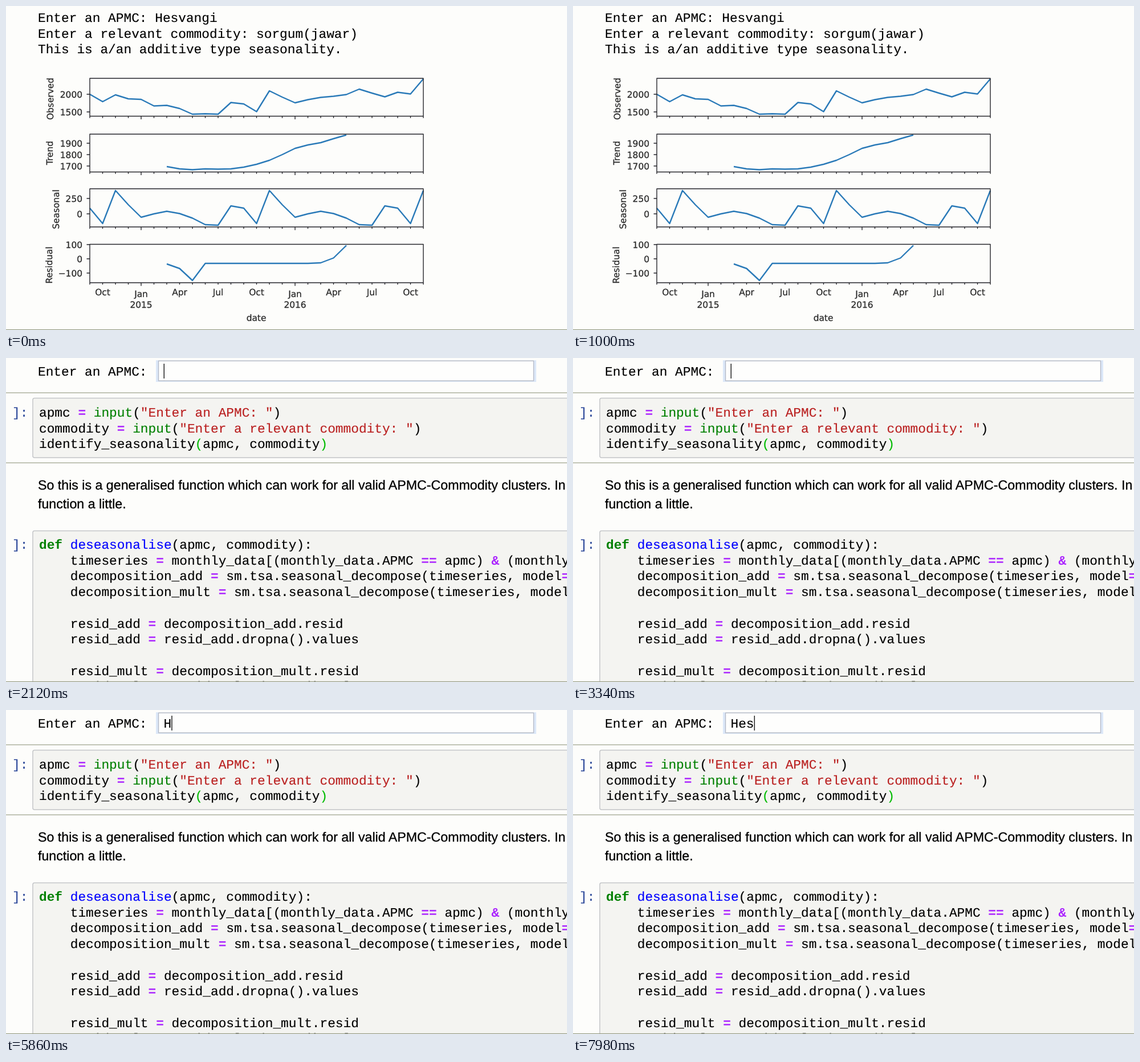
An HTML page with a canvas for the animation above (8000 ms loop, 984 by 569 pixels).

```html
<!DOCTYPE html>
<html lang="en">
<head>
<meta charset="utf-8">
<title>Seasonality notebook</title>
<style>
  html, body { margin: 0; width: 100%; height: 100%; overflow: hidden; background: #fdfdfb; }
  canvas { display: block; width: 984px; height: 569px; }
</style>
</head>
<body>
<canvas id="stage" width="984" height="569"></canvas>
<script>
const ctx = document.getElementById('stage').getContext('2d');
const W = 984, H = 569, LOOP = 8000;
const MONO = '22.8px "Liberation Mono", monospace';
const SANS = '23.19px "Liberation Sans", sans-serif';
const LABEL = '15.4px "DejaVu Sans", sans-serif';
const LABEL_COLOR = '#2b2b2b';
const MARKET = 'Hesvangi';
const LINE_H = 27.7;

// Times at which the input view opens and each letter appears
const OPEN_AT = 2110;
const KEY_TIMES = [5400, 6900, 7200];

const COLORS = {
  plain: '#000', op: '#aa22ff', key: '#008000', builtin: '#008000',
  name: '#0000ff', string: '#ba2121', match: '#00bb00'
};

// A thin outline gives the text its slightly heavy weight
function text(str, x, y, font, color, align = 'left', outline = 0.3) {
  ctx.font = font;
  ctx.fillStyle = ctx.strokeStyle = color;
  ctx.textAlign = align;
  ctx.lineWidth = outline;
  ctx.fillText(str, x, y);
  if (outline) ctx.strokeText(str, x, y);
}

const label = (str, x, y, align = 'center') => text(str, x, y, LABEL, LABEL_COLOR, align);

function mono(str, x, y, color = '#000', bold = false) {
  text(str, x, y, (bold ? 'bold ' : '') + MONO, color, 'left', bold ? 0 : 0.15);
  return x + ctx.measureText(str).width;
}

function kindOf(token, matchParens) {
  if (token[0] === '"' || token[0] === "'") return 'string';
  if (/^(==?|&)$/.test(token)) return 'op';
  if (token === 'def') return 'key';
  if (token === 'input') return 'builtin';
  if (token === 'deseasonalise') return 'name';
  if (matchParens && /^[()]$/.test(token)) return 'match';
  return 'plain';
}

function codeLine(line, x, y, matchParens = false) {
  const tokens = line.match(/"[^"]*"|'[^']*'|==|\w+|\s+|./g) || [];
  for (const token of tokens) {
    const kind = kindOf(token, matchParens);
    x = mono(token, x, y, COLORS[kind], kind === 'op' || kind === 'key');
  }
}

function rule(y) {
  ctx.fillStyle = '#9a9f88';
  ctx.fillRect(0, y, W, 1.2);
}

function codeBox(top, bottom) {
  ctx.beginPath();
  ctx.roundRect(47, top, 1000, bottom - top, 3);
  ctx.fillStyle = '#f4f4f1';
  ctx.fill();
  ctx.strokeStyle = '#c3c5c8';
  ctx.lineWidth = 1.5;
  ctx.stroke();
}

const LEFT = 147, RIGHT = 732, MONTHS = 26;
const STEP = (RIGHT - LEFT) / MONTHS;
const monthX = i => LEFT + i * STEP;

const YEAR = [355, 382, 324, 349, 371, 365, 360.5, 364.5, 372.5, 384, 385, 351];
const PANELS = [
  { title: 'Observed', tx: 83, ty: 163, top: 127, bottom: 193.5, start: 0,
    ticks: [['2000', 155], ['1500', 186]],
    ys: [155, 168, 156, 163, 164, 175.5, 174.5, 180, 190, 189.3, 190, 169.5, 172, 185.5,
         149, 160, 170, 164.5, 160.5, 158.5, 155.5, 146, 153, 159.5, 151.5, 154.5, 128] },
  { title: 'Trend', tx: 82, ty: 258, top: 225, bottom: 291.5, start: 6,
    ticks: [['1900', 241], ['1800', 261], ['1700', 281]],
    ys: [282, 286, 287.5, 286, 286.5, 286, 283, 278, 271, 261, 250, 244, 240, 233, 226.5] },
  { title: 'Seasonal', tx: 93, ty: 357, top: 321, bottom: 388, start: 0,
    ticks: [['250', 338], ['0', 365]],
    ys: Array.from({ length: MONTHS + 1 }, (_, i) => YEAR[i % 12]) },
  { title: 'Residual', tx: 81, ty: 455, top: 418.5, bottom: 486, start: 6,
    ticks: [['100', 419], ['0', 444], ['\u2212100', 469]],
    ys: [453, 461, 482, ...Array(9).fill(452), 451, 442.5, 420.5] }
];

function segment(x1, y1, x2, y2) {
  ctx.moveTo(x1, y1);
  ctx.lineTo(x2, y2);
}

function drawPanel(p) {
  ctx.beginPath();
  p.ys.forEach((y, i) => ctx.lineTo(monthX(p.start + i), y));
  ctx.strokeStyle = '#2a7ab8';
  ctx.lineWidth = 2.4;
  ctx.lineJoin = 'round';
  ctx.stroke();

  ctx.beginPath();
  ctx.rect(LEFT, p.top, RIGHT - LEFT, p.bottom - p.top);
  for (let i = 0; i <= MONTHS; i++) {
    segment(monthX(i), p.bottom, monthX(i), p.bottom + (i % 12 === 4 ? 5.5 : 3.2));
  }
  for (const [, y] of p.ticks) segment(LEFT - 5.5, y, LEFT, y);
  ctx.strokeStyle = '#25252b';
  ctx.lineWidth = 1.4;
  ctx.stroke();

  for (const [value, y] of p.ticks) label(value, 134, y + 5.7, 'right');
  ctx.save();
  ctx.translate(p.tx, p.ty);
  ctx.rotate(-Math.PI / 2);
  label(p.title, 0, 0);
  ctx.restore();
}

function drawResult() {
  ['Enter an APMC: ' + MARKET,
   'Enter a relevant commodity: sorgum(jawar)',
   'This is a/an additive type seasonality.'
  ].forEach((line, i) => mono(line, 56, 28 + i * LINE_H));

  PANELS.forEach(drawPanel);
  const quarters = ['Oct', 'Jan', 'Apr', 'Jul'];
  for (let i = 1; i < MONTHS; i += 3) {
    const name = quarters[(i - 1) / 3 % 4];
    label(name, monthX(i), name === 'Jan' ? 511 : 508);
    if (name === 'Jan') label(i < 12 ? '2015' : '2016', monthX(i), 530);
  }
  label('date', 439, 553);
}

const CALL = [
  'apmc = input("Enter an APMC: ")',
  'commodity = input("Enter a relevant commodity: ")',
  'identify_seasonality(apmc, commodity)'
];
const BODY = [
  'def deseasonalise(apmc, commodity):',
  '    timeseries = monthly_data[(monthly_data.APMC == apmc) & (monthly_data',
  "    decomposition_add = sm.tsa.seasonal_decompose(timeseries, model='additive')",
  "    decomposition_mult = sm.tsa.seasonal_decompose(timeseries, model='mult')",
  '',
  '    resid_add = decomposition_add.resid',
  '    resid_add = resid_add.dropna().values',
  '',
  '    resid_mult = decomposition_mult.resid',
  '    resid_mult = resid_mult.dropna().values'
];

function drawField(t) {
  mono('Enter an APMC:', 56, 30.5);
  ctx.fillStyle = '#dce8f8';
  ctx.fillRect(263, 4, 667, 38);
  ctx.fillStyle = '#fefefd';
  ctx.fillRect(267, 4, 659, 37);
  ctx.strokeStyle = '#b4bac8';
  ctx.lineWidth = 1.4;
  ctx.strokeRect(267.5, 5, 658, 35);

  const typed = MARKET.slice(0, KEY_TIMES.filter(k => t >= k).length);
  const end = mono(typed, 276.5, 30.5);
  ctx.fillStyle = '#222';
  ctx.fillRect(end, 10, 1.5, 26);
}

function drawInput(t) {
  drawField(t);
  rule(60.5);
  rule(183.5);

  codeBox(70.5, 175);
  codeBox(303.5, 640);
  for (const y of [103, 335]) mono(']:', 11, y, '#2b4799');
  CALL.forEach((line, i) => codeLine(line, 58, 103 + i * LINE_H, i === 2));
  BODY.forEach((line, i) => codeLine(line, 58, 335 + i * LINE_H));

  text('So this is a generalised function which can work for all valid APMC-Commodity clusters. In',
    56, 231, SANS, '#000');
  text('function a little.', 56, 263.5, SANS, '#000');
}

function draw() {
  const t = performance.now() % LOOP;
  ctx.textRendering = 'geometricPrecision';
  ctx.fillStyle = '#fdfdfb';
  ctx.fillRect(0, 0, W, H);
  if (t < OPEN_AT) drawResult();
  else drawInput(t);
  rule(H - 1.2);
  requestAnimationFrame(draw);
}
draw();
</script>
</body>
</html>
```
